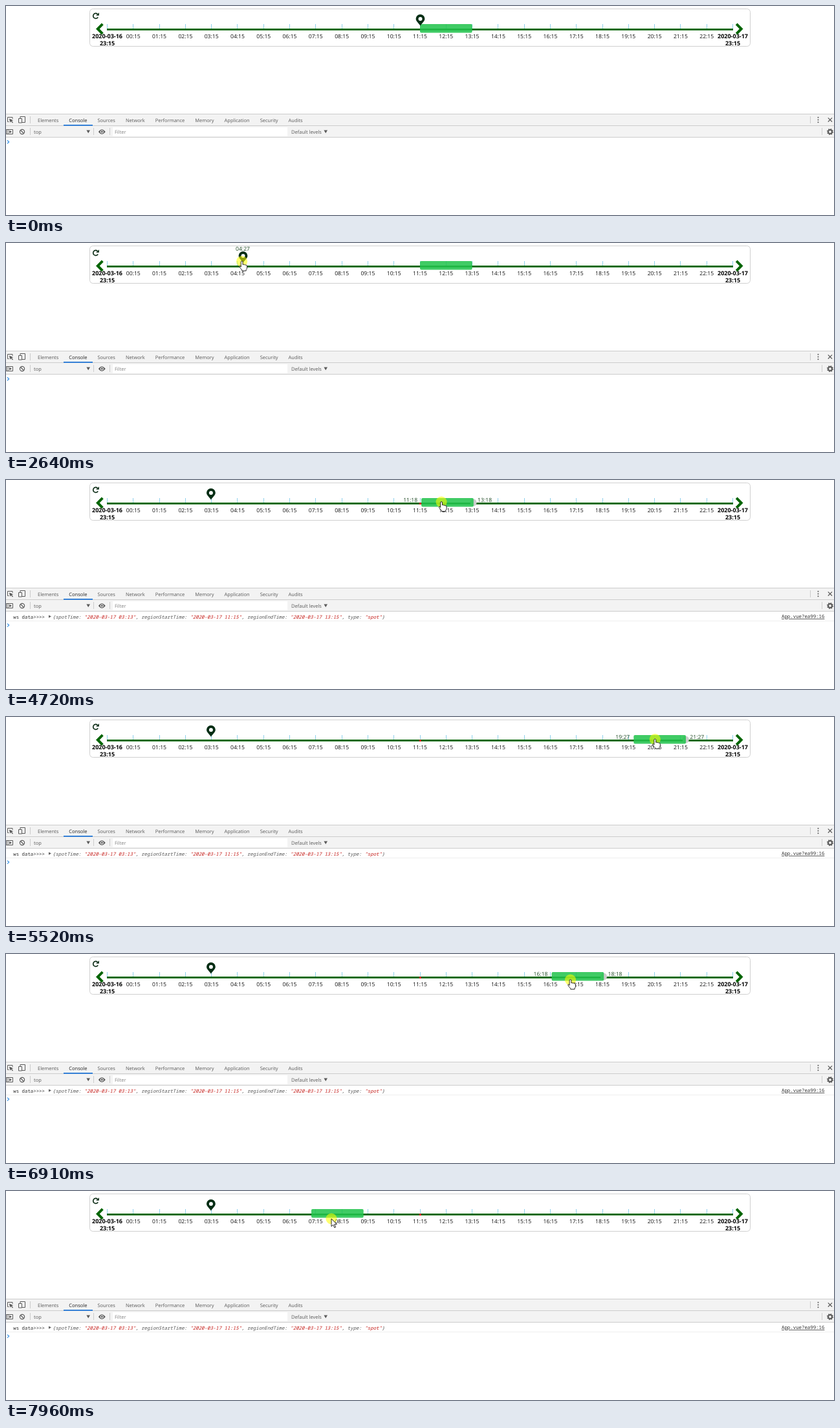
An HTML page that plays this animation: 1280x324 px, repeating every 8 s.

```html
<!DOCTYPE html>
<html lang="en">
<head>
<meta charset="utf-8">
<title>Timeline slider</title>
<style>
  html, body { margin: 0; width: 1280px; height: 324px; overflow: hidden; background: #fff; }
  svg { display: block; text-rendering: geometricPrecision; }
  text { font-family: "Open Sans", "Noto Sans", sans-serif; white-space: pre; }
  .tick { font-size: 8.6px; fill: #111; text-anchor: middle; }
  .date { font-size: 9px; font-weight: 700; fill: #000; text-anchor: middle; }
  .label { font-size: 8.6px; fill: #1f4a24; text-anchor: middle; }
  .tab { font-size: 7.5px; fill: #5a5a5a; }
  .on { fill: #222; }
  .mono { font: 7.385px "Noto Sans Mono", "DejaVu Sans Mono", monospace; fill: #303030; }
  .obj { font-style: italic; fill: #565656; }
  .str { fill: #c41a16; }
  .sep { stroke: #ccc; }
  .icon { fill: none; stroke: #5a5a5a; }
  .solid { fill: #5a5a5a; }
</style>
</head>
<body>
<svg id="stage" width="1280" height="324" viewBox="0 0 1280 324">
  <rect x="129.5" y="4.5" width="1021" height="58" rx="5" fill="#fff" stroke="#d0d0d0"/>
  <g id="ticks"></g>
  <rect x="156" y="35" width="968" height="2.8" fill="#006400"/>
  <g fill="none" stroke="#006400" stroke-width="4">
    <path d="M149.3 27.8L141.8 35.5L149.3 43.2"/>
    <path d="M1129.2 27.8L1136.7 35.5L1129.2 43.2"/>
  </g>
  <path d="M142.2 17.3A4 4 0 1 1 141.4 12.4" fill="none" stroke="#0a2a14" stroke-width="1.6"/>
  <path d="M143.8 10.2V14.8H139.2Z" fill="#0a2a14"/>
  <rect id="mark" x="638.8" y="35.2" width="3.2" height="2.8" rx="1" fill="#f01818"/>

  <g id="region">
    <ellipse id="grip" cx="80.5" cy="35" rx="5" ry="5.5" fill="#ccc"/>
    <rect y="28" width="80.7" height="13.6" rx="2" fill="#24c44f" fill-opacity=".87"/>
    <text id="from" class="label" x="-17" y="34"></text>
    <text id="to" class="label" x="98" y="34"></text>
  </g>

  <g id="pin">
    <path d="M.5 30.8C-1.5 27-6.4 23.9-6.4 19.8A6.9 6.9 0 0 1 7.4 19.8C7.4 23.9 2.5 27 .5 30.8ZM.5 16.9A3 3 0 1 0 .5 22.9A3 3 0 1 0 .5 16.9Z" fill="#032d14" fill-rule="evenodd"/>
    <text id="spot" class="label" y="12"></text>
  </g>

  <g id="tools">
    <rect y="167" width="1280" height="37" fill="#f3f3f3"/>
    <path class="sep" d="M0 167.5H1280M0 185.5H1280M0 203.5H1280M37.5 171V182M1243.5 171V182M37.5 189V200M135.5 189V200M160.5 189V200M1261.5 189V200"/>
    <rect x="89" y="184" width="45" height="1.7" fill="#1a73d8"/>
    <rect x="165" y="188" width="270" height="14" fill="#fff"/>
    <path class="icon" d="M4.5 179.5H2.5V172.5H10V175M22 174V171.5H29.5V180.5H25M19.5 174.5H24.5V181H19.5Z"/>
    <path class="solid" d="M5 174.5L11.2 177.2L8.8 178L11 180.6L10 181.4L7.8 178.8L6.4 180.8Z"/>
    <g class="solid"><circle cx="1255.5" cy="172.8" r="1"/><circle cx="1255.5" cy="176.5" r="1"/><circle cx="1255.5" cy="180.2" r="1"/></g>
    <path class="icon" stroke-width="1.2" d="M1270.8 173.3L1277 179.5M1277 173.3L1270.8 179.5"/>
    <path class="icon" d="M.5 191.5H10.5V198.5H.5ZM3 191.5V198.5"/>
    <path class="solid" d="M5 192.8L9 195L5 197.2Z"/>
    <circle class="icon" cx="25" cy="195" r="3.6" stroke-width="1.2"/>
    <path class="icon" stroke-width="1.2" d="M22.5 192.5L27.5 197.5"/>
    <path class="solid" d="M124.4 192.4H130L127.2 197.2ZM491.4 192.4H497L494.2 197.2Z"/>
    <path class="solid" d="M142.8 195Q148.2 187.6 153.8 195Q148.2 202.4 142.8 195Z"/>
    <circle cx="148.3" cy="195" r="2.5" fill="#f3f3f3"/><circle class="solid" cx="148.3" cy="195" r="1.4"/>
    <circle class="icon" cx="1274" cy="195" r="2.9" stroke-width="2"/>
    <circle class="icon" cx="1274" cy="195" r="4.3" stroke-width="1.4" stroke-dasharray="1.8 1.577"/>
    <text class="tab" id="tabs" x="33" y="179.6"></text>
    <text class="tab" x="43" y="197.8">top</text>
    <text class="tab" x="168" y="198" fill-opacity=".75">Filter</text>
    <text class="tab" x="441" y="197.8">Default levels</text>
  </g>

  <g id="log">
    <path d="M0 218.5H1280" stroke="#efefef"/>
    <path d="M66 209.4L70 211.6L66 213.8Z" fill="#606060"/>
    <text class="mono" x="11.3" y="214.6">ws data&gt;&gt;&gt;&gt;</text>
    <text class="mono obj" id="entry" x="72" y="214.6"></text>
    <text class="mono" x="1199" y="214" text-decoration="underline">App.vue?ea99:16</text>
  </g>
  <path id="prompt" d="M2 208.2L4.6 210.7L2 213.2" fill="none" stroke="#3391e8" stroke-width="1.2"/>

  <g id="cursor">
    <circle id="press" r="8.6" fill="#ffff00" fill-opacity=".56"/>
    <g fill="#fff" stroke="#111" stroke-width=".9" stroke-linejoin="round">
      <path id="arrow" d="M0 0V12L2.8 9.4L4.8 13.8L6.6 13L4.7 8.7H8.4Z"/>
      <path id="hand" d="M-1.4 8.6V1Q-1.4-.4 0-.4T1.4 1V5Q2.6 3.9 3.8 5.3Q5 4.5 6 5.8Q7.8 5.4 8 7V10Q8 12 6.6 13V14.6H.2V13.4Q-2.4 10.6-3.7 8.4Q-3.9 6.9-2.8 7Z"/>
    </g>
  </g>
</svg>
<script>
const $ = id => document.getElementById(id);
const LOOP = 8000, TICK = 78, X0 = 156.5, HOUR = 967 / 24;

function add(parent, tag, attrs, text = '') {
  const el = document.createElementNS('http://www.w3.org/2000/svg', tag);
  for (const k in attrs) el.setAttribute(k, attrs[k]);
  el.textContent = text;
  parent.append(el);
}

const pad = n => String(n).padStart(2, '0');
function clock(x) {
  const m = (Math.round((x - X0) / HOUR * 60) + 1395) % 1440;
  return pad(Math.floor(m / 60)) + ':' + pad(m % 60);
}

// Scale
for (let i = 0; i <= 24; i++) {
  const x = X0 + i * HOUR;
  add($('ticks'), 'path', { d: `M${Math.floor(x) + .5} 28V35`, stroke: '#8fd0ec' });
  if (i % 24) {
    add($('ticks'), 'text', { class: 'tick', x, y: 50 }, clock(x));
  } else {
    add($('ticks'), 'text', { class: 'date', x, y: 50 }, i ? '2020-03-17' : '2020-03-16');
    add($('ticks'), 'text', { class: 'date', x, y: 60.5 }, '23:15');
  }
}

for (const name of 'Elements Console Sources Network Performance Memory Application Security Audits'.split(' '))
  add($('tabs'), 'tspan', { dx: 16, class: name === 'Console' ? 'on' : '' }, name);

// Console entry
const data = { spotTime: '2020-03-17 03:13', regionStartTime: '2020-03-17 11:15',
  regionEndTime: '2020-03-17 13:15', type: 'spot' };
let lead = '{';
for (const key in data) {
  add($('entry'), 'tspan', {}, lead + key + ': ');
  add($('entry'), 'tspan', { class: 'str' }, `"${data[key]}"`);
  lead = ', ';
}
add($('entry'), 'tspan', {}, '}');

const linear = p => p;
const easeIn = p => p * p;
const easeOut = p => p * (2 - p);
const smooth = p => p * p * (3 - 2 * p);

const ENTER = 130, PRESS_PIN = 1700, DROP_PIN = 3720, PRESS_REGION = 4560;

// Pointer strokes; grab is the pointer's distance from the region's left edge
const origin = { x: 1184, y: 308, grab: 31 };
const strokes = [
  { from: ENTER, to: 910, x: 639, y: 34, ease: smooth },
  { from: 910, to: 1150, x: 639.5, y: 25, ease: smooth },
  { from: 1780, to: 2640, x: 364.6, y: 28.5, ease: smooth },
  { from: 2640, to: 3180, x: 315, y: 27, ease: easeOut },
  { from: DROP_PIN, to: 4330, x: 671, y: 34, ease: smooth },
  { from: 4640, to: 4720, x: 673.1, y: 34, ease: linear },
  { from: 4720, to: 5518, x: 1003.3, y: 34.5, grab: 33, ease: smooth },
  { from: 5518, to: 5830, x: 1054, y: 33, ease: easeOut },
  { from: 5990, to: 6910, x: 872.5, y: 40, grab: 29, ease: easeIn },
  { from: 6910, to: 7660, x: 566, y: 44.5, ease: linear },
  { from: 7660, to: 7960, x: 503, y: 43, ease: easeOut },
];

// Each stroke advances in even ticks, as the screen was refreshed
function pointerAt(t) {
  let pos = origin;
  for (const { from, to, x, y, grab = 31, ease } of strokes) {
    if (t < from) break;
    const n = Math.round((to - from) / TICK);
    const p = Math.min(1, Math.floor((t - from) / (to - from) * n + 1e-6) / n);
    const mix = (a, b) => a + (b - a) * ease(p);
    pos = { x: mix(pos.x, x), y: mix(pos.y, y), grab: mix(pos.grab, grab) };
  }
  return pos;
}

const show = (id, on) => $(id).setAttribute('display', on ? 'inline' : 'none');
const move = (id, x, y = 0) => $(id).setAttribute('transform', `translate(${x} ${y})`);

function draw(t) {
  const { x, y, grab } = pointerAt(t);
  const dragging = t >= PRESS_REGION;
  const left = dragging ? x - grab : 640;
  const pinX = t < PRESS_PIN ? 640 : pointerAt(Math.min(t, DROP_PIN)).x + 1.4;
  const overPin = Math.abs(x - pinX) < 8 && y < 31;
  const overRegion = !overPin && x > left && x < left + 81 && y > 28 && y < 42.4;

  move('region', left);
  $('from').textContent = clock(left);
  $('to').textContent = clock(left + 2 * HOUR);
  for (const id of ['from', 'to', 'grip']) show(id, overRegion);
  show('mark', left !== 640);

  move('pin', pinX);
  $('spot').textContent = clock(pinX);
  show('spot', overPin);

  show('log', t >= DROP_PIN);
  move('prompt', 0, t >= DROP_PIN ? 14.4 : 0);

  move('cursor', x, y);
  show('cursor', t >= ENTER);
  show('hand', overPin || overRegion);
  show('arrow', !overPin && !overRegion);
  show('press', dragging || (t >= PRESS_PIN && t < DROP_PIN));
}

const start = performance.now();
function loop() {
  draw((performance.now() - start) % LOOP);
  requestAnimationFrame(loop);
}
loop();
</script>
</body>
</html>
```
